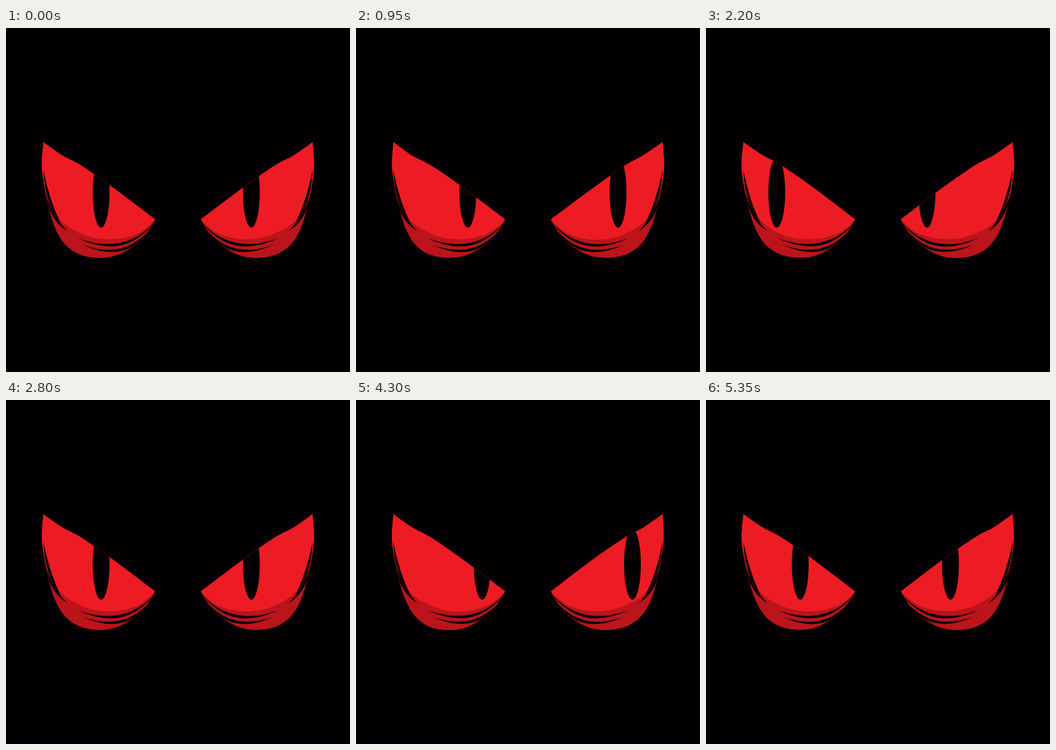
Recreate the animation shown at these times as an HTML page with a canvas. Size 498 px wide and 498 px high, loop 5500 ms.

```html
<!DOCTYPE html>
<html lang="en">
<head>
<meta charset="utf-8">
<title>Glaring eyes</title>
<style>
  html, body { margin: 0; width: 100%; height: 100%; overflow: hidden; background: #020003; }
  canvas { display: block; width: 498px; height: 498px; }
</style>
</head>
<body>
<canvas id="stage" width="498" height="498"></canvas>
<script>
const ctx = document.getElementById('stage').getContext('2d');
const SIZE = 498, LOOP = 5500, GLANCE = 2850, STEP = 50, REACH = 45;
const BLACK = '#020003', RED = '#ed1c24', DARK = '#bb141b';

// Key points of the left eye; the right one is its mirror image.
const LID = [[54, 165], [81, 184], [109, 199], [155, 231], [216, 277]];
const RIM = [[216, 277], [194, 308], [152, 331], [103, 326], [72, 291], [53, 214], [54, 165]];
const SHADE = [[54, 218], [72, 271], [110, 298], [150, 306], [190, 298], [217, 277]];
// Each crease: start, control point, end
const CREASES = [
  [[54, 205], [60, 253], [79, 282]],
  [[57, 240], [66, 277], [89, 294]],
  [[103, 304], [171, 333], [214, 282]],
  [[111, 314], [177, 341], [214, 284]]
];

const progress = (t, from, to) => Math.max(0, Math.min(1, (t - from) / (to - from)));
const smooth = u => u * u * (3 - 2 * u);

// Drift right, dart left, come back to the middle.
function look(t) {
  const drift = progress(t, 400, 1150) ** 2;
  const dart = smooth(progress(t, 1475, 1725));
  const back = smooth(progress(t, 2050, 2550));
  return REACH * (drift - 2 * dart + back);
}

function noise(n) {
  const s = Math.sin(n * 127.1 + 11.7) * 43758.5453;
  return (s - Math.floor(s)) * 2 - 1;
}

// Hand-drawn wobble; the end points stay put so that edges meet.
function wobble(pts, seed, pose) {
  const amount = pose ? 0.6 : 0;
  return pts.map(([x, y], i) => {
    if (i === 0 || i === pts.length - 1) return [x, y];
    const n = pose * 53 + seed * 211 + i * 7;
    return [x + noise(n) * amount, y + noise(n + 3.3) * amount];
  });
}

// Smooth curve through all points.
function curve(pts) {
  const at = i => pts[Math.max(0, Math.min(pts.length - 1, i))];
  for (let i = 0; i < pts.length - 1; i++) {
    const a = at(i - 1), b = at(i), c = at(i + 1), d = at(i + 2);
    ctx.bezierCurveTo(b[0] + (c[0] - a[0]) / 6, b[1] + (c[1] - a[1]) / 6,
      c[0] - (d[0] - b[0]) / 6, c[1] - (d[1] - b[1]) / 6, c[0], c[1]);
  }
}

// A bent line that tapers to a point at both ends.
function crease([a, mid, b], width) {
  const dx = b[0] - a[0], dy = b[1] - a[1];
  const r = width / Math.hypot(dx, dy);
  ctx.beginPath();
  ctx.moveTo(...a);
  ctx.quadraticCurveTo(mid[0] - dy * r, mid[1] + dx * r, ...b);
  ctx.quadraticCurveTo(mid[0] + dy * r, mid[1] - dx * r, ...a);
  ctx.fill();
}

function eye(mirror, pupilX, pose) {
  const seed = mirror ? 40 : 0;
  const lid = wobble(LID, seed + 1, pose);
  const rim = wobble(RIM, seed + 2, pose);
  ctx.save();
  if (mirror) {
    ctx.translate(SIZE, 0);
    ctx.scale(-1, 1);
  }
  ctx.beginPath();
  ctx.moveTo(...lid[0]);
  curve(lid);
  curve(rim);
  ctx.closePath();
  ctx.fillStyle = RED;
  ctx.fill();

  ctx.save();
  ctx.clip();
  ctx.beginPath();
  ctx.moveTo(40, 218);
  ctx.lineTo(...SHADE[0]);
  curve(wobble(SHADE, seed + 3, pose));
  ctx.lineTo(230, 345);
  ctx.lineTo(40, 345);
  ctx.fillStyle = DARK;
  ctx.fill();

  ctx.fillStyle = BLACK;
  CREASES.forEach((c, i) => crease(wobble(c, seed + 4 + i, pose), 3.8));

  ctx.beginPath();
  ctx.ellipse(mirror ? SIZE - pupilX : pupilX, 238, 12.2, 51, 0, 0, Math.PI * 2);
  ctx.fill();
  ctx.restore();

  ctx.beginPath();
  ctx.moveTo(...lid[0]);
  curve(lid);
  ctx.lineWidth = 0.7;
  ctx.strokeStyle = 'rgba(110, 18, 22, 0.4)';
  ctx.stroke();
  ctx.restore();
}

function draw(now) {
  const t = Math.floor(now % LOOP / STEP) * STEP;
  const pose = Math.floor((t + 50) / 150) % 19;
  const x = look(t % GLANCE);
  ctx.fillStyle = BLACK;
  ctx.fillRect(0, 0, SIZE, SIZE);
  eye(false, 137.7 + x, pose);
  eye(true, 355.2 + x, pose);
}

let start;
function tick(now) {
  if (start === undefined) start = now;
  draw(now - start);
  requestAnimationFrame(tick);
}
draw(0);
requestAnimationFrame(tick);
</script>
</body>
</html>
```
